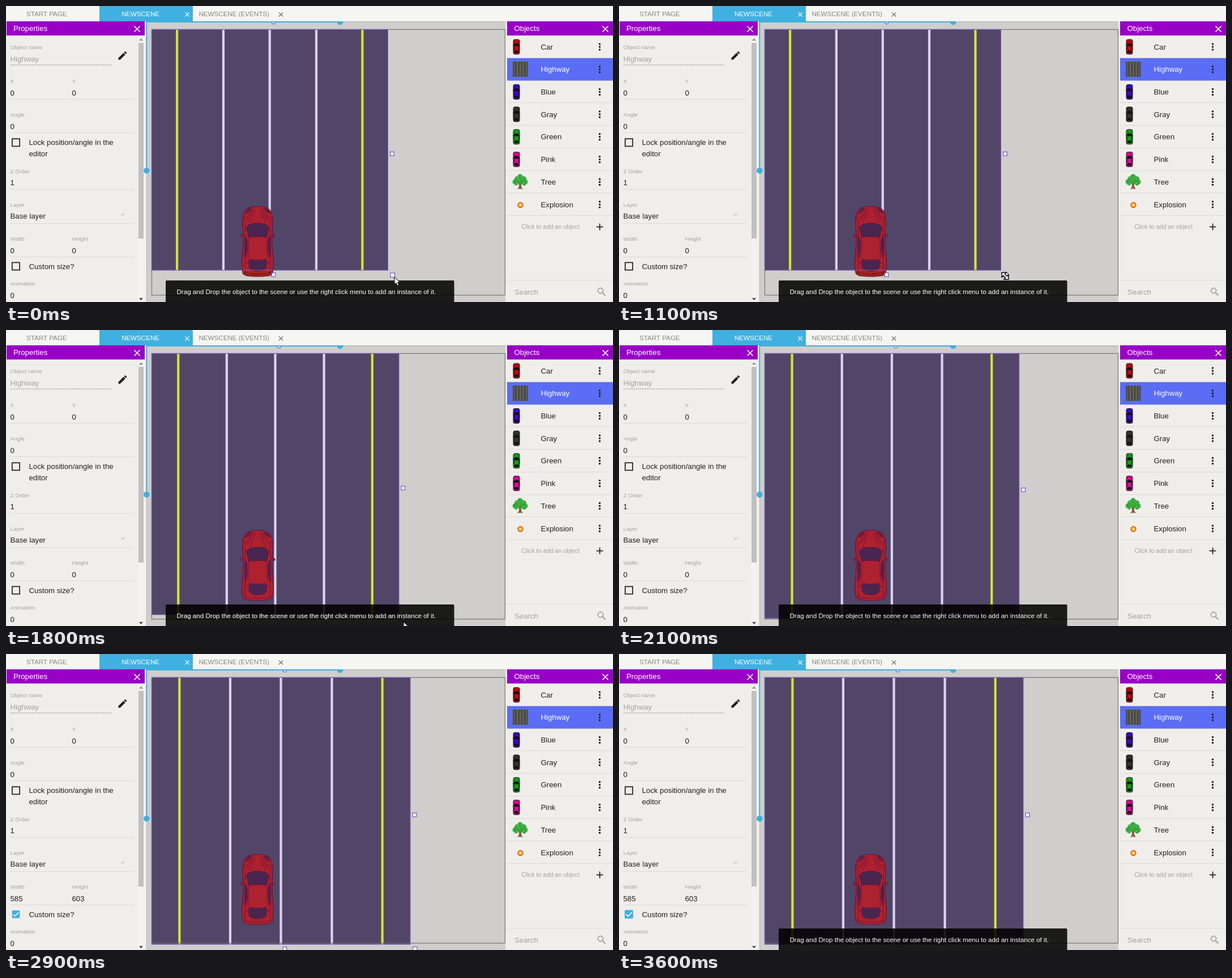
These frames come from a looping animation (1072x522 px, 4500 ms). An HTML page with a canvas:

```html
<!DOCTYPE html>
<html lang="en">
<head>
<meta charset="utf-8">
<title>Scene editor</title>
<style>
html, body { margin: 0; width: 100%; height: 100%; overflow: hidden; background: #f0eeeb; }
canvas { display: block; }
</style>
</head>
<body>
<canvas id="stage" width="1072" height="522"></canvas>
<script>
const ctx = document.getElementById('stage').getContext('2d');
const LOOP = 4500, STEP = 100;
const FONT = '"Liberation Sans", Arial, sans-serif';
const INK = '#1f1f1e', MUTED = '#a3a2a0', RULE = '#dcdad7', PURPLE = '#9800c6', BLUE = '#3fb0e0';
const BIG = 13.22, MID = 11.6, SMALL = 9.91;
const ROAD = { x: 257, y: 41 };
const CAR_X = 444.5;

const rect = (x, y, w, h, color) => { ctx.fillStyle = color; ctx.fillRect(x, y, w, h); };

function text(s, x, cy, size = BIG, color = INK) {
  ctx.font = `${size}px ${FONT}`;
  ctx.fillStyle = color;
  ctx.fillText(s, x, cy + size * 0.35);
}

function line(points, color, width = 1) {
  ctx.beginPath();
  points.forEach(([x, y], i) => i ? ctx.lineTo(x, y) : ctx.moveTo(x, y));
  ctx.strokeStyle = color;
  ctx.lineWidth = width;
  ctx.stroke();
}

function disc(x, y, r, color) {
  ctx.beginPath();
  ctx.arc(x, y, r, 0, 7);
  ctx.fillStyle = color;
  ctx.fill();
}

function round(x, y, w, h, r, color) {
  ctx.beginPath();
  ctx.roundRect(x, y, w, h, r);
  ctx.fillStyle = color;
  ctx.fill();
}

function shape(d, fill, stroke, width = 1) {
  const p = new Path2D(d);
  if (fill) { ctx.fillStyle = fill; ctx.fill(p); }
  if (stroke) { ctx.strokeStyle = stroke; ctx.lineWidth = width; ctx.stroke(p); }
}

function at(x, y, draw, sx = 1, sy = sx) {
  ctx.save();
  ctx.translate(x, y);
  ctx.scale(sx, sy);
  draw();
  ctx.restore();
}

function cross(x, y, r, color, width) {
  line([[x - r, y - r], [x + r, y + r]], color, width);
  line([[x - r, y + r], [x + r, y - r]], color, width);
}

const clamp = v => Math.max(0, Math.min(1, v));
const easeOut = p => 1 - (1 - clamp(p)) ** 4;

function track(t, keys) {
  if (t <= keys[0][0]) return keys[0][1];
  for (let i = 1; i < keys.length; i++) {
    const [t0, v0] = keys[i - 1], [t1, v1] = keys[i];
    if (t <= t1) return v0 + (v1 - v0) * (t - t0) / (t1 - t0);
  }
  return keys[keys.length - 1][1];
}

function tabs() {
  rect(0, 0, 1072, 27, '#f5f5f3');
  rect(165, 0, 165, 27.5, BLUE);
  text('START PAGE', 36, 14, MID, '#858585');
  text('NEWSCENE', 204, 14, MID, '#fff');
  text('NEWSCENE (EVENTS)', 340.5, 14, MID, '#858585');
  cross(320, 15, 3.6, '#fff', 1.3);
  cross(485.5, 15, 3.6, '#666', 1.3);
}

function header(title, x, w, tx) {
  rect(x, 27, w, 25, PURPLE);
  text(title, tx, 39.5, BIG, '#fff');
}

function tick(t) {
  const x = 17.5, y = 459, on = t >= 2600;
  ctx.globalAlpha = on ? 1 - easeOut((t - 2550) / 400) : 1;
  ctx.strokeStyle = INK;
  ctx.lineWidth = 1.7;
  ctx.strokeRect(x - 6.6, y - 6.6, 13.2, 13.2);
  ctx.globalAlpha = 1;
  if (!on) return;
  at(x, y, () => {
    round(-7.5, -7.5, 15, 15, 1.7, BLUE);
    line([[-5.2, 0.2], [-1.8, 3.6], [5.3, -3.5]], '#fff', 1.7);
  }, easeOut((t - 2550) / 800));
}

function properties(t) {
  rect(0, 27, 248, 495, '#f0eeeb');
  header('Properties', 1, 244, 13);
  cross(231.5, 40.5, 5, '#fff', 1.7);

  const sized = t >= 2600;
  const labels = [['Object name', 7.5, 73], ['X', 7.5, 132.5], ['Y', 116.5, 132.5], ['Angle', 7.5, 192],
    ['Z Order', 7.5, 291.5], ['Layer', 7.5, 351], ['Width', 7.5, 410.5], ['Height', 116.5, 410.5], ['Animation', 7.5, 490]];
  const values = [['0', 7.5, 153], ['0', 116.5, 153], ['0', 7.5, 212.5], ['1', 7.5, 311.5], ['Base layer', 7.5, 370],
    [sized ? '585' : '0', 7.5, 431], [sized ? '603' : '0', 116.5, 431], ['0', 7.5, 510],
    ['Lock position/angle in the', 40.5, 240.5], ['editor', 40.5, 260.5], ['Custom size?', 40.5, 459]];
  for (const [s, x, y] of labels) text(s, x, y, SMALL, MUTED);
  for (const [s, x, y] of values) text(s, x, y);
  text('Highway', 7.5, 93.5, BIG, MUTED);
  for (const y of [164, 223, 323, 383, 442]) rect(7.5, y, 218.5, 1, RULE);

  ctx.setLineDash([1.6, 1.6]);
  line([[8, 104], [186, 104]], '#999', 1.6);
  ctx.setLineDash([]);
  at(196, 77.5, () => shape('M3 17.25V21h3.75L17.8 9.95 14.05 6.2zM20.7 7c.4-.4.4-1 0-1.4l-2.3-2.3c-.4-.4-1-.4-1.4 0l-1.9 1.8 3.8 3.8z', INK), 0.826);
  shape('M202 366.5h8.4l-4.2 4.2z', '#d3d1ce');
  ctx.strokeStyle = INK;
  ctx.lineWidth = 1.7;
  ctx.strokeRect(10.9, 234.2, 13.2, 13.2);
  tick(t);

  rect(233, 52, 12, 470, '#f3f2f0');
  rect(234, 65, 9, 345, '#c1c0c0');
  shape('M235 61h7l-3.5 -4z', '#8d8d8d');
  shape('M235 515h7l-3.5 4z', '#444');
}

function smallCar(y, color) {
  at(901.5, y, () => {
    round(-6, -13.5, 12, 27, 4, '#111');
    round(-5.2, -12.7, 10.4, 25.4, 3.6, color);
    shape('M-4.6 -5Q0 -7.6 4.6 -5L3.5 -.8Q0 -2 -3.5 -.8z M-3.5 6.5H3.5L4 10.5Q0 11.5 -4 10.5z M-5.3 -3L-4 0V5L-5.3 7z M5.3 -3L4 0V5L5.3 7z', '#121212');
    line([[-2.5, -12], [-3, -7]], '#0006', 0.7);
    line([[2.5, -12], [3, -7]], '#0006', 0.7);
    rect(-6.6, -3, 1.2, 1.2, '#222');
    rect(5.4, -3, 1.2, 1.2, '#222');
  });
}

function tree(y) {
  shape(`M903 ${y + 13}Q907 ${y + 10} 906 ${y + 1}H910Q909 ${y + 10} 913 ${y + 13}L908 ${y + 12}z`, '#8a5a35');
  line([[907.5, y + 5], [902, y]], '#8a5a35', 1.5);
  line([[908.5, y + 5], [914, y]], '#8a5a35', 1.5);
  const leaves = [[899, 0, 4.6], [903, -5, 5], [908, -9, 5], [914, -5, 5], [917, 0, 4.7], [908, -2, 6], [901, 3, 3.4], [915, 3, 3.4]];
  leaves.forEach(([x, dy, r], i) => disc(x, y + dy, r, i % 2 ? '#36a63b' : '#45b649'));
  leaves.forEach(([x, dy], i) => disc(x - 1, y + dy - 1.5, 1.5, i % 2 ? '#58c457' : '#2a9137'));
}

function objects() {
  rect(882, 27, 190, 495, '#f0eeeb');
  header('Objects', 885, 187, 897.5);
  cross(1058.5, 40.5, 5, '#fff', 1.7);
  const names = ['Car', 'Highway', 'Blue', 'Gray', 'Green', 'Pink', 'Tree', 'Explosion'];
  const paint = { Car: '#c00a0c', Blue: '#3c08c4', Gray: '#333331', Green: '#149a19', Pink: '#dc0a94' };
  names.forEach((name, i) => {
    const y = 72 + 39.7 * i, picked = name === 'Highway';
    rect(885, Math.round(y + 19), 187, 1, RULE);
    if (picked) rect(885, 92, 187, 39.5, '#5b6df5');
    text(name, 944.5, y, BIG, picked ? '#fff' : INK);
    for (const d of [-5, 0, 5]) disc(1048.5, y + d, 1.75, INK);
    if (paint[name]) smallCar(y, paint[name]);
  });

  rect(895, 98, 26.5, 27, '#4b4b49');
  [0.108, 0.304, 0.5, 0.697, 0.892].forEach((f, i) => rect(894.6 + 26.5 * f, 98, 0.9, 27, i % 4 ? '#858583' : '#77753f'));
  tree(310.2);
  disc(908.5, 351, 5.2, '#dc4a22');
  disc(908.5, 351, 3.9, '#f3a52c');
  disc(908.5, 351, 2.5, '#f5d968');

  text('Click to add an object', 910.3, 389.5, 10.74, MUTED);
  line([[1042.7, 389.5], [1054.5, 389.5]], INK, 1.7);
  line([[1048.6, 383.6], [1048.6, 395.4]], INK, 1.7);
  rect(885, 483, 187, 1, RULE);
  text('Search', 898, 504, BIG, MUTED);
  ctx.beginPath();
  ctx.arc(1050, 502, 4.6, 0, 7);
  ctx.strokeStyle = '#a09f9d';
  ctx.lineWidth = 1.7;
  ctx.stroke();
  line([[1053.5, 505.5], [1058.5, 510.5]], '#a09f9d', 2);
}

function mirrored(draw) {
  draw();
  at(0, 0, draw, -1, 1);
}

function bigCar(body, edge, glass) {
  at(CAR_X, 353, () => {
    mirrored(() => shape('M25 49L30.5 50.5V53.5L25 52z', body, edge));
    shape('M0 .5C12 0 19 3 23 9C27 16 27.5 28 26 40C25 55 25 68 26.5 80C28.5 96 28 111 26 119Q22 124 0 124Q-22 124 -26 119C-28 111 -28.5 96 -26.5 80C-25 68 -25 55 -26 40C-27.5 28 -27 16 -23 9C-19 3 -12 0 0 .5z', body, edge, 1.2);
    shape('M-20 37Q-15 30 0 30Q15 30 20 37L16 55Q0 51.5 -16 55z', glass, edge);
    shape('M-15 94Q0 97 15 94L15.5 108Q11 114 0 114Q-11 114 -15.5 108z', glass, edge);
    mirrored(() => {
      shape('M22.5 49L18.5 60V80L22 92L23 70z', glass, edge, 0.8);
      shape('M12 3Q19 5 22 13Q15 11 12 3z', glass, edge, 0.8);
      shape('M7 4Q11 14 18 25M10 3Q15 14 21 24M4 5Q10 19 14 30M24 17Q21 30 22 47M16 56L17 92M22 93Q23 108 22 119M26 82Q22 86 22 93', null, edge, 0.9);
      shape('M15.5 98h4v3h-4', null, edge, 0.8);
    });
    shape('M-24 117Q0 123 24 117', null, edge, 0.8);
  });
}

function handle(x, y, size) {
  rect(x - size / 2, y - size / 2, size, size, '#fff');
  ctx.strokeStyle = '#7c51c9';
  ctx.lineWidth = 1.2;
  ctx.strokeRect(x - size / 2, y - size / 2, size, size);
}

function roadStrips(w, h) {
  rect(ROAD.x, ROAD.y, w, h, '#524668');
  [0.108, 0.304, 0.5, 0.697, 0.892].forEach((f, i) => {
    rect(ROAD.x + w * f - 2.1, ROAD.y, 4.2, h, i % 4 ? '#dcd2f1' : '#cfe635');
  });
}

function clipTo(x, y, w, h, draw) {
  ctx.save();
  ctx.beginPath();
  ctx.rect(x, y, w, h);
  ctx.clip();
  draw();
  ctx.restore();
}

function scene(right, bottom) {
  const w = right - ROAD.x, h = bottom - ROAD.y;
  rect(248, 27, 634, 495, '#cfcecc');
  rect(248, 27, 634, 1.5, '#bdbdbb');
  rect(247.5, 27, 1.5, 495, '#b5b5b3');

  roadStrips(w, h);
  clipTo(ROAD.x, ROAD.y, w, h, () => bigCar('#ae222f', '#65113a', '#482650'));
  clipTo(ROAD.x, bottom, w, 60, () => {
    bigCar('#b92622', '#3c0d12', '#221418');
    for (let y = 468; y < 476; y += 2.5)
      for (let x = -23; x < 24; x += 3) rect(CAR_X + x + (y % 5 ? 1.5 : 0), y, 1.2, 1.2, '#6b1214');
  });

  ctx.strokeStyle = '#6f6e6d';
  ctx.lineWidth = 1.1;
  ctx.strokeRect(257.4, 41.4, 624, 468.5);
  ctx.strokeStyle = '#7a58c4';
  ctx.lineWidth = 1;
  ctx.strokeRect(ROAD.x + 0.3, ROAD.y + 0.3, w - 0.3, h - 0.3);

  const cx = ROAD.x + w / 2 + 6.8, cy = ROAD.y + h / 2 + 7.2;
  clipTo(248, 27, 634, 495, () => {
    disc(cx, 28.3, 3.9, '#7c51c9');
    disc(cx, 28.3, 2.7, '#fff');
    handle(right + 7.4, cy, 6.6);
    handle(cx, bottom + 8, 6.6);
    handle(right + 8.3, bottom + 8.5, 7.6);
  });

  rect(248, 27, 342, 2, BLUE);
  rect(247.3, 27, 1.8, 263, BLUE);
  clipTo(580, 27, 20, 10, () => disc(590, 28, 5.4, BLUE));
  disc(248.2, 290.3, 5.2, BLUE);
}

function toast(t) {
  let shown = 1, alpha = 1;
  if (t >= 2600 && t <= 2900) {
    shown = alpha = 1 - easeOut((t - 2550) / 350);
  } else if (t > 2900) {
    shown = easeOut((t - 2930) / 400);
    alpha = easeOut((t - 3030) / 500);
  }
  if (shown <= 0) return;
  const dy = 40 * (1 - shown);
  round(282, 484 + dy, 509.5, 40, 1.7, 'rgba(0,0,0,.87)');
  ctx.globalAlpha = alpha;
  text('Drag and Drop the object to the scene or use the right click menu to add an instance of it.', 301.5, 504 + dy, MID, '#fff');
  ctx.globalAlpha = 1;
}

function arrow(x, y) {
  at(x, y, () => shape('M0 0V13L3 10.3L5.3 15.4L7.8 14.3L5.6 9.3H9.7z', '#fff', '#000', 1));
}

function resizer(x, y) {
  at(x, y, () => shape('M-6 -6H2L-.6 -3.3L3.3 .6L6 -2V6H-2L.6 3.3L-3.3 -.6L-6 2z', '#fff', '#000', 1.4));
}

function pointer(t, right, bottom) {
  if (t < 100) arrow(686, 478);
  else if (t < 200) resizer(684, 477);
  else if (t < 400) resizer(683, 476.5);
  else if (t < 1200) resizer(682, 476);
  else if (t < 2500) arrow(right + 8, bottom + 12.7);
}

function render(t) {
  const right = track(t, [[1100, 674.5], [1400, 684], [1800, 694], [2200, 711], [2400, 714]]);
  const bottom = track(t, [[1100, 466], [1400, 488], [1800, 502], [2200, 510.5], [2400, 512]]);
  rect(0, 0, 1072, 522, '#f0eeeb');
  tabs();
  scene(right, bottom);
  properties(t);
  rect(247.3, 27, 1.8, 263, BLUE);
  disc(248.2, 290.3, 5.2, BLUE);
  objects();
  toast(t);
  pointer(t, right, bottom);
}

const start = performance.now();
function loop() {
  const ms = (performance.now() - start) % LOOP;
  render(Math.floor(ms / STEP) * STEP);
  requestAnimationFrame(loop);
}
loop();
</script>
</body>
</html>
```
